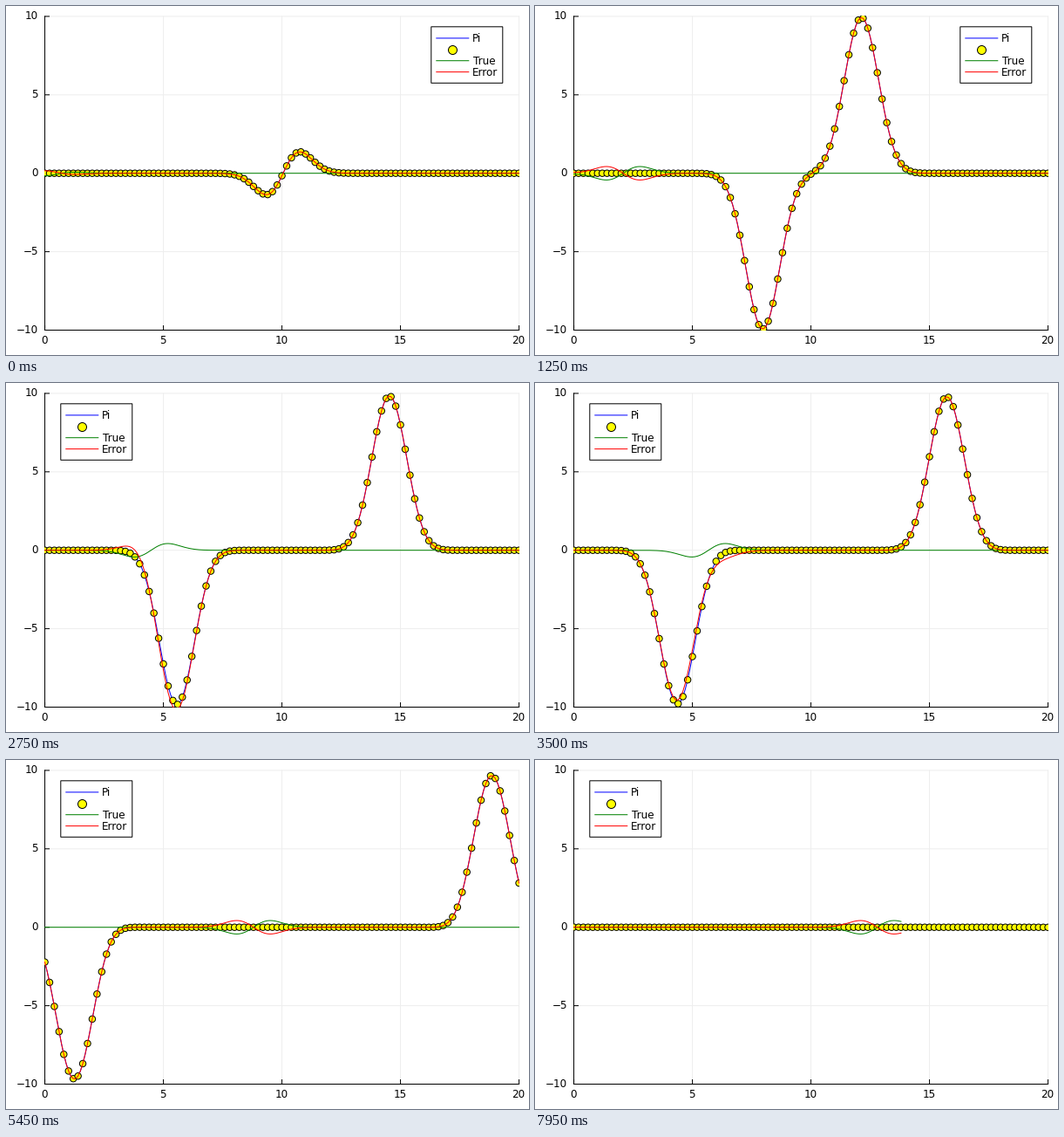
A matplotlib script for the animation above (8 s loop, 600 px wide and 400 px high).

```python
import numpy as np
import matplotlib.pyplot as plt
from matplotlib.animation import FuncAnimation
from matplotlib.patches import Rectangle

FRAMES, INTERVAL = 160, 50
STEP = 0.08             # distance a wave travels per frame
CENTER = 10.05
LEGEND_SWITCH = 51      # frame at which the legend moves to the left
PX = 0.72               # points per pixel at 100 dpi
LEFT, TOP, RIGHT, BOTTOM = 44.55, 11.9, 588.55, 371.5

plt.rcParams["font.family"] = "DejaVu Sans"


def to_x(x):
    return LEFT + 27.2 * x


def to_y(y):
    return 191.7 - 17.98 * y


grid = np.linspace(0, 20, 201)


def pulse(d, eps):
    """Gaussian with a little fourth-order numerical smoothing."""
    g = np.exp(-d**2)
    return 10 * g * (1 - eps * (16 * d**4 - 48 * d**2 + 12))


def pressure(n):
    reach, eps = STEP * (n + 1), 2.5e-5 * n
    d_right, d_left = grid - CENTER - reach, grid - CENTER + reach
    p = pulse(d_right, eps) - pulse(d_left, eps)
    # the open ends damp the passing crest slightly
    p[0] *= 1 - 0.025 * np.exp(-d_left[0]**2)
    p[-1] *= 1 - 0.025 * np.exp(-d_right[-1]**2)
    return p


def exact(n):
    reach = STEP * (n + 1)
    a, b = grid - reach, grid + reach
    wave = a * np.exp(-a**2) - b * np.exp(-b**2)
    # the closed form overflows where exp(4*x*reach) does
    return np.where(4 * grid * reach > 709.78, np.nan, wave)


fig = plt.figure(figsize=(6, 4), dpi=100, facecolor="white")
ax = fig.add_axes([0, 0, 1, 1])
ax.set_xlim(0, 600)
ax.set_ylim(400, 0)
ax.axis("off")
ax.set_autoscale_on(False)


def line(xs, ys, color, z):
    return ax.plot(xs, ys, color=color, lw=PX, zorder=z, snap=False)[0]


def dots(xs, ys, size, z):
    # one size per dot keeps sub-pixel positions
    return ax.scatter(xs, ys, s=np.full(len(xs), (size * PX)**2), c="yellow",
                      edgecolors="black", linewidths=PX, zorder=z)


def label(x, baseline, s, ha):
    return ax.text(x, baseline, s, fontsize=12 * PX, ha=ha, va="baseline",
                   zorder=12)


# grid, ticks and axes
for v in range(0, 21, 5):
    x = to_x(v)
    line([x, x], [TOP, BOTTOM], "#eeeeee", 1)
    line([x, x], [BOTTOM, BOTTOM - 5], "black", 2)
    label(x - 0.5, 387.2, str(v), "center")
for v in range(-10, 11, 5):
    y = to_y(v)
    line([LEFT, RIGHT], [y, y], "#eeeeee", 1)
    line([LEFT, LEFT + 5], [y, y], "black", 2)
    label(37, y + 3.5, str(v).replace("-", "\u2212"), "right")
line([LEFT, LEFT], [TOP, BOTTOM], "black", 2)
line([LEFT, RIGHT], [BOTTOM, BOTTOM], "black", 2)

# curves
px = to_x(grid)
pi_line = line([], [], "blue", 3)
pi_dots = dots(px[::2], np.full(101, to_y(0)), 7.4, 4)
true_line = line([], [], "green", 5)
error_line = line([], [], "red", 6)
window = Rectangle((LEFT - 0.5, TOP - 0.5), RIGHT - LEFT + 1,
                   BOTTOM - TOP + 1, transform=ax.transData)
for artist in (pi_line, pi_dots, true_line, error_line):
    artist.set_clip_path(window)


def legend(x):
    box = Rectangle((x, 23.8), 82, 64.5, fc="white", ec="black", lw=PX,
                    zorder=10, snap=False)
    parts = [ax.add_patch(box), dots([x + 24.2], [49.6], 10, 11)]
    rows = (("Pi", "blue", 36.9, 47.2), ("True", "green", 62.7, 48.3),
            ("Error", "red", 75.6, 47.2))
    for text, color, y, dx in rows:
        parts.append(line([x + 6, x + 43], [y, y], color, 11))
        parts.append(label(x + dx, y + 4.4, text, "left"))
    return parts


legend_right, legend_left = legend(487.8), legend(62.8)


def update(n):
    p, t = pressure(n), exact(n)
    pi_line.set_data(px, to_y(p))
    pi_dots.set_offsets(np.column_stack([px[::2], to_y(p[::2])]))
    true_line.set_data(px, to_y(t))
    error_line.set_data(px, to_y(p - t))
    for part in legend_right:
        part.set_visible(n < LEGEND_SWITCH)
    for part in legend_left:
        part.set_visible(n >= LEGEND_SWITCH)
    return pi_line, pi_dots, true_line, error_line


anim = FuncAnimation(fig, update, frames=FRAMES, interval=INTERVAL,
                     init_func=lambda: update(0), repeat=True,
                     repeat_delay=0, blit=False)
plt.show()
```
